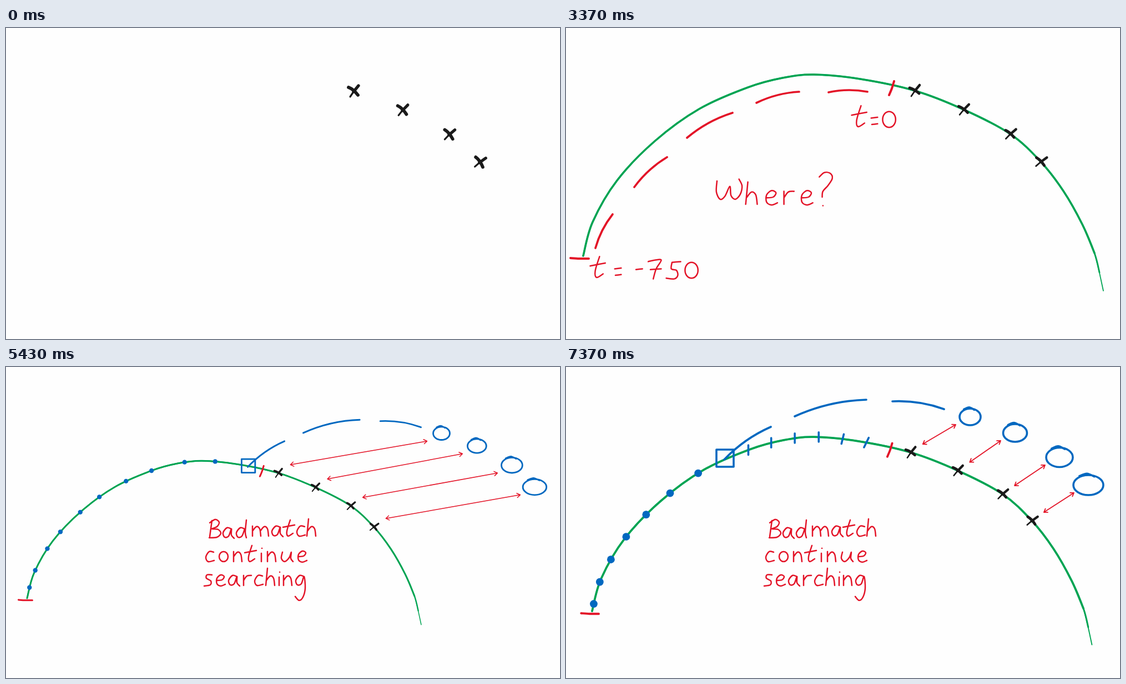
These frames come from a looping animation (998 by 561 pixels, 8000 ms). An HTML page:

```html
<!DOCTYPE html>
<html lang="en">
<head>
<meta charset="utf-8">
<title>Trajectory sketch</title>
<style>
  html, body { margin: 0; width: 100%; height: 100%; overflow: hidden; background: #fefefe; }
  svg { display: block; width: 998px; height: 561px; }
  path { fill: none; stroke-linecap: round; stroke-linejoin: round; }
</style>
</head>
<body>
<svg id="stage" viewBox="0 0 998 561" xmlns="http://www.w3.org/2000/svg"></svg>
<script>
const GREEN = '#00a453', RED = '#e31327', BLUE = '#0068c0', BLACK = '#1a1a1a';
const LOOP = 8000;
const stage = document.getElementById('stage');

function add(parent, tag, attrs) {
  const el = document.createElementNS(stage.namespaceURI, tag);
  for (const key in attrs) el.setAttribute(key, attrs[key]);
  return parent.appendChild(el);
}
const group = (parent, transform = '') => add(parent, 'g', { transform });
const line = (parent, color, width, d) => add(parent, 'path', { d, stroke: color, 'stroke-width': width });
const oval = ([cx, cy, rx, ry]) =>
  `M${cx - rx} ${cy}a${rx} ${ry} 0 1 1 ${2 * rx} 0a${rx} ${ry} 0 1 1 ${-2 * rx} 0z`;

// Smooth curve through the points of one pen stroke
function smooth(p) {
  if (p.length === 1) return `M${p[0]}h.1`;
  let d = `M${p[0]}`;
  for (let i = 0; i < p.length - 1; i++) {
    const a = p[i - 1] || p[i], b = p[i], c = p[i + 1], e = p[i + 2] || c;
    const h1 = b.map((v, k) => v + (c[k] - a[k]) / 6);
    const h2 = c.map((v, k) => v - (e[k] - b[k]) / 6);
    d += `C${h1} ${h2} ${c}`;
  }
  return d;
}

// Strokes are split by "/"; a leading "o" means an oval: cx cy rx ry
function strokes(text) {
  return text.split('/').map(s => {
    const n = s.match(/-?[\d.]+/g).map(Number);
    if (s[0] === 'o') return oval(n);
    return smooth(n.flatMap((v, i) => i % 2 ? [] : [[v, n[i + 1]]]));
  }).join('');
}

// Handwriting: [width, strokes], built from shared parts on a baseline at 0
const STEM = '0 -18 0 0/', HUMP = '0 -9 7 -17 13 -13 15 0';
const BOWL = '15 -16 7 -18 0 -9 3 -1 10 -3 15 -16';
const GLYPHS = {
  a: [20, BOWL + ' 15 -5 20 1'],
  c: [14, '14 -17 6 -18 0 -8 4 0 15 -2'],
  d: [17, BOWL + '/18 -32 16 -10 18 0'],
  e: [16, '1 -9 11 -10 15 -16 9 -19 2 -13 2 -3 9 1 17 -2'],
  f: [16, '15 -26 10 -32 5 -22 6 3 8 19 2 21 1 11 7 1/-3 -11 17 -15'],
  g: [16, BOWL + ' 17 5 13 21 6 27 -1 20'],
  h: [16, '2 -31 -1 0/' + HUMP],
  i: [1, '0 -15 0 0/1 -24'],
  j: [1, '0 -18 0 2 -4 11 -12 9/0 -28'],
  m: [30, STEM + HUMP + '/14 -9 21 -17 27 -13 29 0'],
  n: [15, STEM + HUMP],
  o: [16, 'o 8 -9 8 9'],
  p: [14, '1 -18 0 14/0 -13 8 -20 14 -14 10 -5 1 -3'],
  r: [13, STEM + '0 -9 6 -17 14 -18'],
  s: [14, '14 -19 5 -19 4 -13 12 -8 11 -1 0 1'],
  t: [15, '8 -29 2 -9 4 0 13 -5/-5 -16 16 -20'],
  u: [19, '2 -17 0 -6 6 0 14 -7 18 -17 17 -6 21 0'],
  w: [31, '1 -19 0 -7 5 0 12 -5 16 -15 17 -5 23 0 30 -8 32 -21 28 -23'],
  y: [17, '0 -17 1 -6 8 -4 14 -15/16 -18 16 9 11 22 2 25 -2 18'],
  B: [21, '5 -31 1 -2/1 -27 11 -33 18 -28 14 -20 5 -16 16 -15 21 -8 14 -1 0 0'],
  C: [18, '16 -24 7 -27 0 -17 1 -5 8 0 18 -4'],
  G: [40, '29 -31 16 -30 3 -19 0 -7 9 0 23 0 34 -7 37 -18/19 -18 40 -19'],
  K: [24, '2 -28 2 0/20 -28 4 -12 12 -6 24 -2'],
  S: [15, '14 -30 5 -29 2 -22 9 -15 13 -8 9 -1 0 -1'],
  W: [42, '0 -31 -1 -13 5 -1 13 -6 21 -22 23 -7 30 -1 38 -9 41 -23 36 -34'],
  0: [19, 'o 9 -10 9 11'],
  5: [18, '8 -21 7 -12 14 -10 16 -3 11 2 0 1/8 -21 20 -22'],
  7: [17, '0 -22 9 -24 18 -24 11 -12 7 2/3 -11 18 -12'],
  '?': [18, '0 -38 7 -44 15 -43 18 -36 12 -26 5 -18 4 -10/5 2'],
  '=': [9, '0 -12 9 -13/1 -3 9 -4'],
  '-': [9, '0 -11 9 -12']
};

function write(parent, color, text, x, y, gap, size = 1) {
  const g = group(parent, `translate(${x} ${y}) scale(${size})`);
  g.setAttribute('role', 'img');
  g.setAttribute('aria-label', text);
  let left = 0;
  for (const ch of text) {
    const [width, shape] = GLYPHS[ch];
    line(group(g, `translate(${left} 0)`), color, 2.5 / size, strokes(shape));
    left += width + gap;
  }
}

// The trajectory passes through the four sightings
const SIGHTINGS = [[628, 113], [716, 147], [800, 191], [855, 241]];
const ARC = [[31, 411], [48, 350], [92, 275], [160, 204], [240, 146], [328, 107], [390, 90], [447, 84],
  [530, 92], ...SIGHTINGS, [896, 294], [930, 354], [952, 406]];
const TIP = [968, 474];
const track = document.createElementNS(stage.namespaceURI, 'path');
track.setAttribute('d', smooth(ARC));

function onTrack(length) {
  const { x, y } = track.getPointAtLength(length);
  return [x, y];
}

function arc(parent, width) {
  line(parent, GREEN, width * .5, smooth([...ARC, TIP]));
  line(parent, GREEN, width * .8, smooth([...ARC, [961, 441]]));
  line(parent, GREEN, width, smooth(ARC));
}

function crosses(parent, width, slope, dx = 0, dy = 0) {
  SIGHTINGS.forEach(([x, y], i) => {
    const g = group(parent, `translate(${x + dx} ${y + dy}) rotate(${i * 5})`);
    line(g, BLACK, width * .55, 'M0 1L-6 10');
    line(g, BLACK, width * .9, 'M9 -10L0 1');
    line(g, BLACK, width, `M-9 ${-slope}Q0 ${-slope / 2} 8 ${slope}`);
  });
}

const ends = parent => line(parent, RED, 4, strokes('591 96 587 109 582 121/8 415 24 416 41 416'));

// Dashes that bow outwards in proportion to their length
function dashes(parent, color, pairs) {
  for (const [x1, y1, x2, y2] of pairs) {
    const k = .1, cx = (x1 + x2) / 2 + (y2 - y1) * k, cy = (y1 + y2) / 2 - (x2 - x1) * k;
    line(parent, color, 3.7, `M${x1} ${y1}Q${cx} ${cy} ${x2} ${y2}`);
  }
}

function arrow(parent, width, [x1, y1], [x2, y2]) {
  const a = Math.atan2(y2 - y1, x2 - x1), size = 7;
  const head = (x, y, dir) => [-.6, .6].map(t =>
    `M${x} ${y}l${size * Math.cos(dir + t)} ${size * Math.sin(dir + t)}`).join('');
  line(parent, RED, width, `M${x1} ${y1}L${x2} ${y2}` + head(x1, y1, a) + head(x2, y2, a + Math.PI));
}

// A placement maps a point p to at + scale * (p - from)
const transform = ({ at, from, scale }) => `translate(${at}) scale(${scale}) translate(${from.map(v => -v)})`;
const place = ({ at, from, scale }, p) => at.map((v, k) => v + scale * (p[k] - from[k]));

// Guessed flight path and the four positions it predicts
const PREDICTED = [[728, 90, 19, 15], [809, 119, 21.5, 16], [889, 163, 24, 17.5], [941, 213, 27, 18]];
function guess(parent) {
  dashes(parent, BLUE, [[285, 167, 369, 108], [412, 89, 541, 59], [588, 62, 681, 76]]);
  line(parent, BLUE, 3.6, 'M271 149h31v31h-31z');
  for (const [x, y, rx, ry] of PREDICTED) {
    const curl = smooth([[x - rx * .6, y - ry * .9], [x - rx * .1, y - ry * 1.15], [x + rx * .4, y - ry * .85]]);
    line(parent, BLUE, 3.6, oval([x, y, rx, ry]) + curl);
  }
}

function badMatch(parent) {
  write(parent, RED, 'Bad', 366, 308, 4);
  write(parent, RED, 'match', 444, 305, 5);
  write(parent, RED, 'continue', 360, 351, 10);
  write(parent, RED, 'searching', 357, 394, 7);
}

function compare(parent, arcAt, guessAt, arrowWidth, addSteps) {
  const g = group(parent, transform(arcAt));
  arc(g, 3.9);
  ends(group(g, 'translate(2.5 0)'));
  addSteps(g);
  guess(group(parent, transform(guessAt)));
  crosses(g, 5, 5);
  SIGHTINGS.forEach((p, i) => {
    const [x1, y1] = place(arcAt, p), [x2, y2] = place(guessAt, PREDICTED[i]);
    arrow(parent, arrowWidth, [x1 + 22, y1 - 15], [x2 - 26, y2 + 14]);
  });
  badMatch(parent);
}

function dots(parent, count, r, lengthAt) {
  for (let i = 0; i < count; i++) {
    const [cx, cy] = onTrack(lengthAt(i));
    add(parent, 'circle', { cx, cy, r, fill: BLUE });
  }
}

function marksOnly(g) {
  crosses(g, 5.8, 7, -2, 1);
}

function knownShape(g) {
  arc(g, 4.2);
  crosses(g, 5, 5);
  const say = (...args) => write(g, GREEN, ...args);
  say('We', 361, 271, 8);
  say('Know', 435, 273, 8);
  say('Shape', 317, 315, 6);
  say('of', 450, 315, 0);
  say('tra', 502, 318, 8);
  say('jec', 574, 320, 7);
  say('tory', 621, 320, 2);
  say('through', 307, 363, 7);
  say('C', 498, 370, 0);
  say('d', 519, 372, 0, .85);
  say('and', 560, 368, 5);
  say('G', 639, 376, 0);
}

function whereAt(g) {
  arc(g, 3.6);
  ends(g);
  crosses(g, 5, 5);
  dashes(g, RED, [[53, 397, 84, 336], [123, 287, 182, 233], [218, 198, 300, 153],
    [343, 135, 420, 115], [473, 116, 543, 115]]);
  const ask = (...args) => write(g, RED, ...args, 1.3);
  write(g, RED, 'W', 272, 310, 0, 1.1);
  ask('here?', 325, 318, 10);
  ask('t=0', 521, 178, 7);
  ask('t=', 50, 450, 14);
  ask('-750', 126, 450, 8);
}

function lateGuess(g) {
  compare(g, { at: [38, 417], from: [31, 411], scale: .7577 },
    { at: [437, 178], from: [287, 164], scale: .788 }, 1.5,
    arcGroup => dots(arcGroup, 10, 5.5, i => 26 + 47.5 * i + 1.85 * i * i - 6 * (i % 2)));
}

function earlyGuess(g) {
  compare(g, { at: [47, 440.4], from: [31, 411], scale: .961 },
    { at: [0, 0], from: [0, 0], scale: 1 }, 1.8,
    arcGroup => {
      dots(arcGroup, 7, 7.2, i => 14 + 40.5 * i + 2.2 * i * i);
      for (let i = 0; i < 6; i++) {
        const [x, y] = onTrack(440 + 45 * i), lean = 2.2 * Math.max(0, i - 3);
        line(arcGroup, BLUE, 3.7, `M${x + lean} ${y - 9}L${x - lean} ${y + 9}`);
      }
    });
}

const scenes = [[0, marksOnly], [500, knownShape], [2500, whereAt], [4570, lateGuess], [6570, earlyGuess]]
  .map(([start, draw]) => {
    const g = group(stage);
    draw(g);
    return { start, g };
  });

function show(now) {
  const t = now % LOOP;
  const current = scenes.filter(s => s.start <= t).pop();
  for (const s of scenes) s.g.style.display = s === current ? '' : 'none';
}

let origin;
function tick(now) {
  origin ??= now;
  show(now - origin);
  requestAnimationFrame(tick);
}
show(0);
requestAnimationFrame(tick);
</script>
</body>
</html>
```
